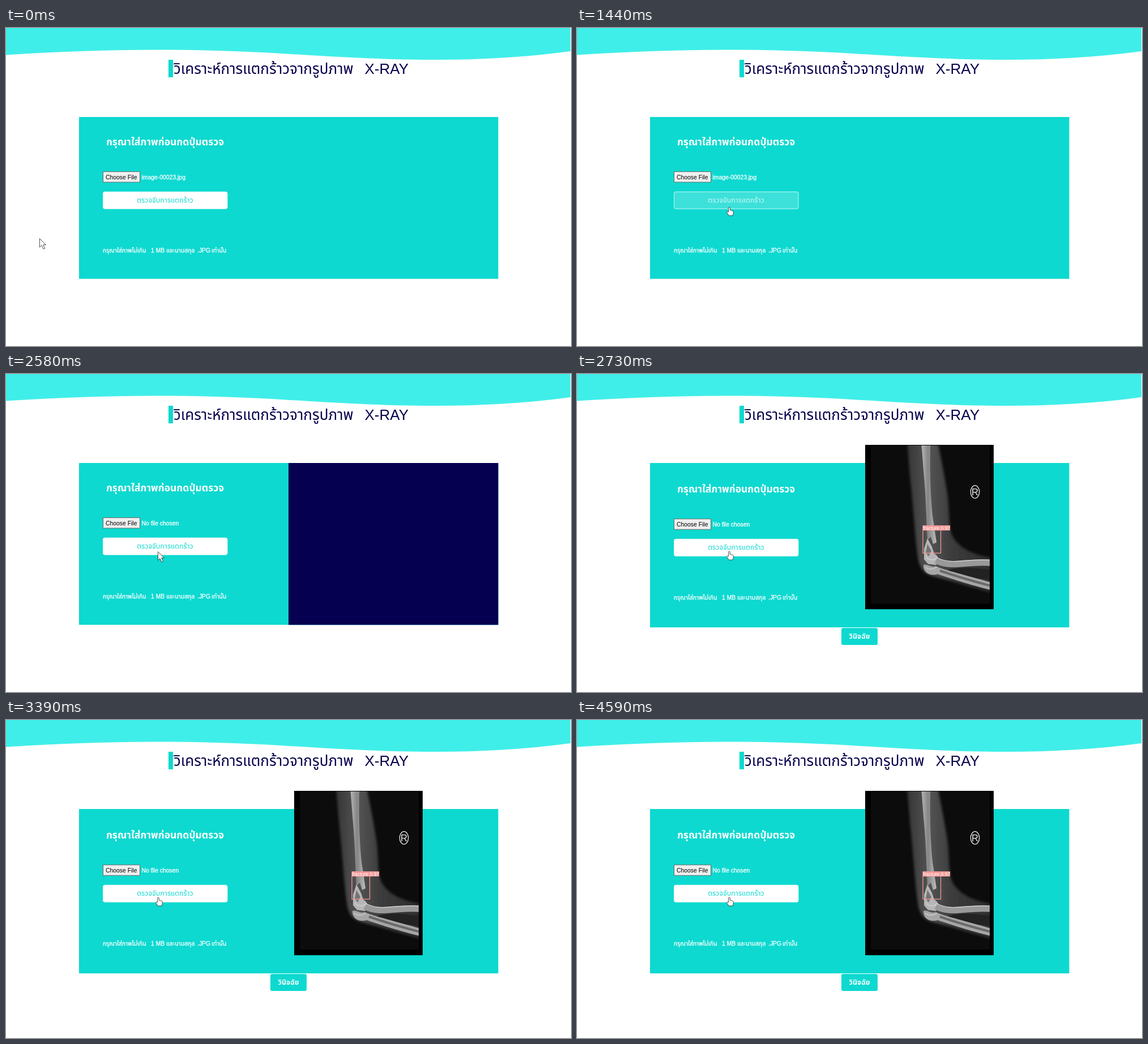
Write an HTML page that moves like this. It is 998 by 561 pixels and loops after 4.68 s.

```html
<!DOCTYPE html>
<html lang="th">
<head>
<meta charset="utf-8">
<title>X-RAY</title>
<style>
  html, body { margin: 0; width: 100%; height: 100%; overflow: hidden; background: #fff; }
  svg { display: block; width: 100vw; height: 100vh; font-family: "Liberation Sans", Arial, "Noto Sans Thai", Loma, sans-serif; }
  .small { font-size: 10.4px; }
  .crisp { stroke: #fff; stroke-width: .3; }
  .bold { font-weight: bold; }
</style>
</head>
<body>
<svg viewBox="0 0 998 561">
  <defs>
    <filter id="soft" x="-20%" y="-20%" width="140%" height="140%"><feGaussianBlur stdDeviation="2.2"/></filter>
    <filter id="fine" x="-20%" y="-20%" width="140%" height="140%"><feGaussianBlur stdDeviation=".7"/></filter>
    <linearGradient id="flesh" x1="0" y1="0" x2="1" y2="0">
      <stop offset="0" stop-color="#363636"/>
      <stop offset=".25" stop-color="#545454"/>
      <stop offset=".5" stop-color="#3c3c3c"/>
      <stop offset="1" stop-color="#2c2c2c"/>
    </linearGradient>
    <linearGradient id="shaft" x1="0" y1="0" x2="1" y2="0">
      <stop offset="0" stop-color="#b8b8b8"/>
      <stop offset=".45" stop-color="#858585"/>
      <stop offset="1" stop-color="#bdbdbd"/>
    </linearGradient>
    <clipPath id="film"><rect x="519" y="126" width="210" height="279"/></clipPath>
  </defs>

  <path fill="#40eee9" d="M0 0H997V41C800 68 610 52 470 44S170 36 0 47.5Z"/>
  <rect x="287" y="56" width="8" height="31" fill="#0dd9d0"/>
  <g fill="#06004c" font-size="26">
    <text x="296" y="81">วิเคราะห์การแตกร้าวจากรูปภาพ</text>
    <text x="633.5" y="81">X-RAY</text>
  </g>

  <rect id="panel" x="129" y="157" width="740.5" height="285.5" fill="#0dd9d0"/>
  <rect id="loading" x="499" y="157" width="370.5" height="285.5" fill="#05004f"/>

  <g id="form">
    <text class="bold" x="281" y="207" font-size="17.5" text-anchor="middle" fill="#fff">กรุณาใส่ภาพก่อนกดปุ่มตรวจ</text>
    <rect x="171.5" y="253.5" width="65" height="18.5" fill="#efefef" stroke="#6b6b6b"/>
    <text class="small" x="176" y="266.5" fill="#000">Choose File</text>
    <text id="fileName" class="small crisp" x="239.5" y="266.5" fill="#fff"></text>
    <rect id="button" x="171.5" y="289" width="219.5" height="30" rx="3" stroke="#fff"/>
    <text id="buttonText" x="281" y="308" font-size="12.5" text-anchor="middle">ตรวจจับการแตกร้าว</text>
    <g class="small crisp" fill="#fff">
      <text x="171" y="396">กรุณาใส่ภาพไม่เกิน</text>
      <text x="256" y="396">1 MB</text>
      <text x="283" y="396">และนามสกุล</text>
      <text x="338" y="396">.JPG</text>
      <text x="363" y="396">เท่านั้น</text>
    </g>
  </g>

  <g id="result">
    <rect x="509" y="125" width="227" height="290" fill="#000"/>
    <g clip-path="url(#film)">
      <rect x="519" y="126" width="210" height="279" fill="#0c0c0c"/>
      <path filter="url(#soft)" fill="url(#flesh)" d="M583 118H637C643 150 649 178 654 210C659 245 655 270 664 288C678 310 705 321 740 325V388C700 377 660 365 627 356C612 352 605 342 602 324C596 280 594 230 588 180Z"/>
      <g filter="url(#fine)">
        <path fill="url(#shaft)" d="M608 118H624C623 170 624 210 628 250L635 297L629 300L625 287L619 293C617 250 616 210 612 170Z"/>
        <path fill="#b6b6b6" d="M619 290L627 305L631 317C640 321 640 331 634 337L620 335L613 327L613 308Z"/>
        <path fill="#747474" d="M619 300L626 312L621 322L616 315Z"/>
        <path fill="#222" d="M655 346C680 338 705 343 740 346V364C705 361 680 357 655 346Z"/>
        <path fill="none" stroke="#999" stroke-width="11" d="M634 329C665 344 690 328 740 334"/>
        <path fill="#a6a6a6" d="M612 337C618 334 624 342 633 339C650 346 690 356 740 370V383C700 374 660 361 637 353C625 357 611 351 612 337Z"/>
        <path fill="none" stroke="#696969" stroke-width="4" d="M641 347C670 357 700 366 740 376"/>
        <path fill="none" stroke="#d0d0d0" stroke-width="1.4" d="M616 322C621 330 632 329 637 323M615 341C622 346 630 345 636 340M636 324C665 339 690 323 740 329"/>
      </g>
    </g>
    <ellipse cx="703" cy="208" rx="7.7" ry="11.3" fill="none" stroke="#eee" stroke-width="1.3"/>
    <text x="703" y="214" font-size="16.5" text-anchor="middle" fill="#eee">R</text>
    <rect x="611" y="275.5" width="31.5" height="40.5" fill="none" stroke="#f59999" stroke-width="1.3"/>
    <rect x="610.5" y="267" width="48.5" height="9" fill="#f59999"/>
    <text x="611" y="274.7" font-size="8.6" fill="#fff">fracture 0.97</text>
    <rect x="467" y="448" width="64" height="30" rx="3" fill="#0dd9d0"/>
    <text class="bold" x="499" y="467" font-size="12.5" text-anchor="middle" fill="#fff">วินิจฉัย</text>
  </g>

  <g stroke="#222" stroke-width=".8" stroke-linejoin="round" fill="#fff">
    <path id="arrow" d="M.4 .5V15.8L4 12.4L7 19L9.6 17.9L6.8 11.5H11.6Z"/>
    <path id="hand" d="M-1.4 8.6V1.2Q-1.4 0 0 0T1.3 1.2V5L2.7 5.3L4.2 5.7L5.5 6.2Q7.2 6.6 7.2 8.1V11.2L6 15H-.8L-3.8 10.4Q-5 8.8-3.8 8.1T-1.4 8.6Z"/>
  </g>
</svg>

<script>
const LOOP = 4680;
const HOVER = 1290, PRESS = 1980, SUBMIT = 2580, RESULT = 2730;
const TEAL = [13, 217, 208], WHITE = [255, 255, 255], BLUE = [12, 176, 210];

// Pointer tip: time, x, y
const POINTER = [
  [510, 59, 371], [600, 60, 374], [750, 60, 374], [900, 150, 411],
  [1020, 255, 416], [1110, 311, 391], [1200, 295, 346], [1260, 280, 329],
  [1350, 270, 317], [1440, 269, 316], [1680, 269, 316], [1710, 269, 313]
];

const $ = id => document.getElementById(id);
const clamp = v => Math.min(1, Math.max(0, v));
const progress = (t, start, length) => clamp((t - start) / length);
const easeOut = p => 1 - (1 - p) ** 2.3;
const lerp = (a, b, p) => a + (b - a) * p;
const mix = (a, b, p) => `rgb(${a.map((v, i) => Math.round(lerp(v, b[i], p)))})`;
const show = (id, on) => $(id).setAttribute("display", on ? "inline" : "none");
const set = (id, attrs) => Object.entries(attrs).forEach(([k, v]) => $(id).setAttribute(k, v));

function pointerAt(t) {
  const next = POINTER.findIndex(key => key[0] > t);
  if (next === 0) return POINTER[0].slice(1);
  if (next < 0) return POINTER[POINTER.length - 1].slice(1);
  const a = POINTER[next - 1], b = POINTER[next];
  const p = progress(t, a[0], b[0] - a[0]);
  return [lerp(a[1], b[1], p), lerp(a[2], b[2], p)];
}

function drawButton(t) {
  const submitted = t >= SUBMIT;
  const hover = submitted ? 0 : easeOut(progress(t, HOVER, 300));
  const press = submitted ? 0 : progress(t, PRESS, 90);
  set("button", {
    fill: press ? mix(TEAL, BLUE, press) : mix(WHITE, TEAL, hover),
    stroke: mix(WHITE, [64, 190, 222], press),
    "stroke-opacity": .75
  });
  set("buttonText", {
    fill: mix(TEAL, WHITE, hover),
    stroke: press ? "#fff" : "none",
    "stroke-width": .4 * press
  });
}

function render(t) {
  const done = t >= RESULT, submitted = t >= SUBMIT;
  show("loading", submitted && !done);
  show("result", done);
  set("panel", { height: done ? 290 : 285.5 });
  set("form", { transform: `translate(0 ${done ? 2.2 : 0})` });
  $("fileName").textContent = submitted ? "No file chosen" : "image-00023.jpg";
  drawButton(t);

  const isHand = done || (t >= HOVER && t < PRESS);
  const [x, y] = pointerAt(t);
  show("hand", isHand);
  show("arrow", !isHand);
  set("hand", { transform: `translate(${x} ${y})` });
  set("arrow", { transform: `translate(${t >= PRESS ? x - 1 : x} ${y})` });
}

const start = performance.now();
function tick() {
  render((performance.now() - start) % LOOP);
  requestAnimationFrame(tick);
}
tick();
</script>
</body>
</html>
```
